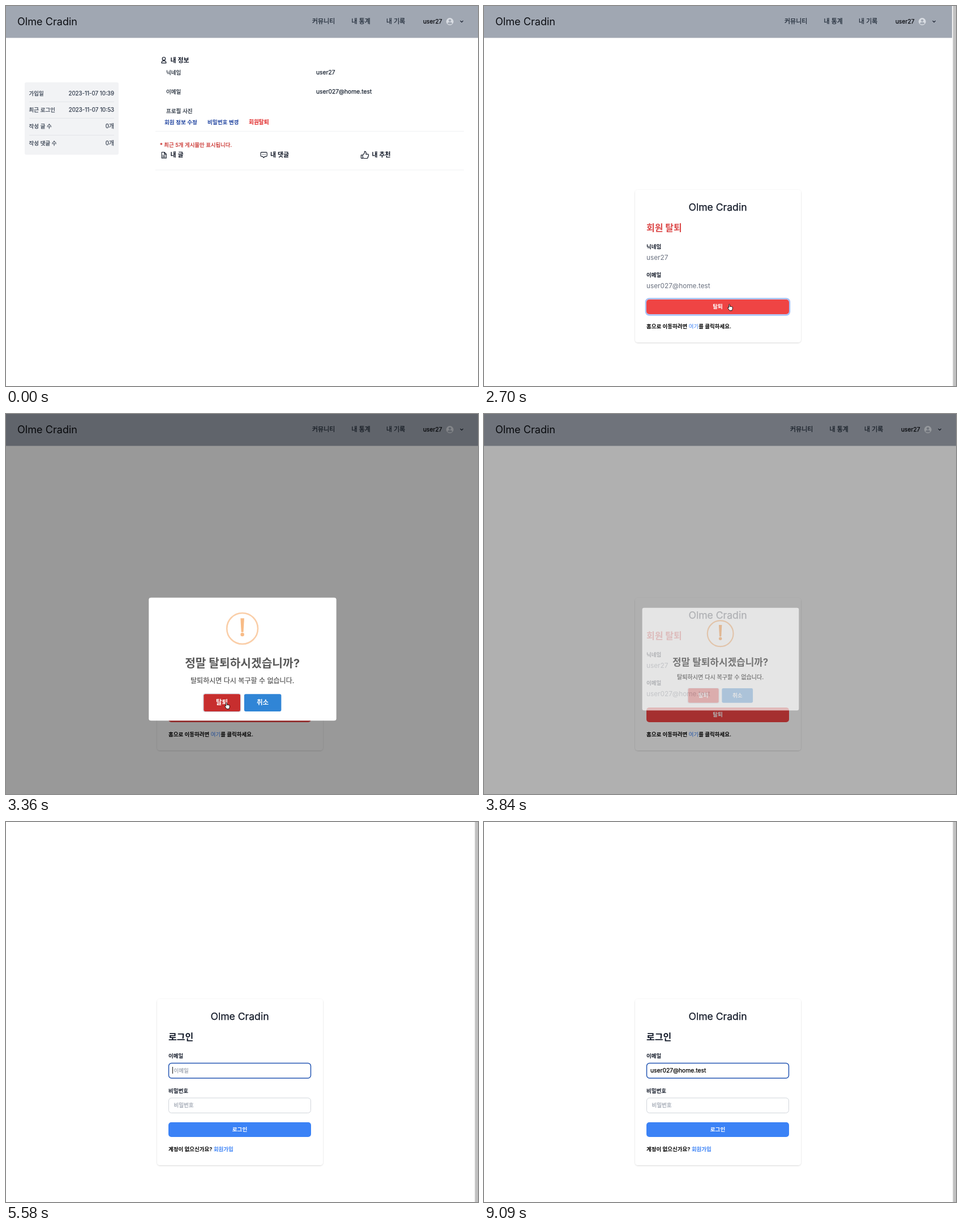
An HTML page that plays this animation: 834x672 px, repeating every 9300 ms.

```html
<!DOCTYPE html>
<html lang="ko">
<head>
<meta charset="utf-8">
<title>회원 탈퇴</title>
<style>
html, body { margin: 0; width: 100%; height: 100%; overflow: hidden; background: #fff; }
svg { display: block; width: 100vw; height: 100vh; font-family: Inter, "Noto Sans CJK KR", "Noto Sans CJK JP", sans-serif; }
</style>
</head>
<body>
<svg id="stage" viewBox="0 0 834 672"></svg>
<script>
const LOOP = 9300;
const BRAND = "Olme Cradin", USER = "user27", MAIL = "user027@home.test";
const BLUE = "#3b82f6", RED = "#ef4444", INK = "#111827";
const stage = document.getElementById("stage");

// y is the visual middle of the line; medium Hangul is a regular face with a hairline outline
const text = (x, y, size, str, fill = INK, weight = 400, anchor = "start", extra = "") => {
  const outline = weight === 500 ? `stroke="${fill}" stroke-width="0.25"` : "";
  return `<text x="${x}" y="${(y + size * 0.37).toFixed(2)}" font-size="${size}" fill="${fill}" font-weight="${weight === 500 ? 400 : weight}" text-anchor="${anchor}" ${outline} ${extra}>${str}</text>`;
};
const rect = (x, y, w, h, r, fill, extra = "") =>
  `<rect x="${x}" y="${y}" width="${w}" height="${h}" rx="${r}" fill="${fill}" ${extra}/>`;
const rule = (x1, x2, y, color) => `<path d="M${x1} ${y}H${x2}" stroke="${color}"/>`;
const icon = (d, width = 1.2) =>
  `<path d="${d}" fill="none" stroke="${INK}" stroke-width="${width}" stroke-linejoin="round" stroke-linecap="round"/>`;
const link = (str, weight) => `<tspan fill="${BLUE}" stroke="none" font-weight="${weight}">${str}</tspan>`;
const group = (id, body) => `<g id="${id}">${body}</g>`;
const card = (y, h) => rect(267, y, 293, h, 5, "#fff", 'filter="url(#soft)"') +
  text(413, y + 30.5, 17.6, BRAND, INK, 500, "middle");

const header = rect(0, 0, 834, 56.4, 0, "#a0a7b2") +
  text(20, 27, 18.1, BRAND, "#0b0d12") +
  group("nav",
    text(541, 27, 11, "커뮤니티", "#1f2937", 500) +
    text(610.5, 27, 11, "내 통계", "#1f2937", 500) +
    text(672, 27, 11, "내 기록", "#1f2937", 500) +
    text(737, 27, 10.3, USER, "#0b0d12", 500) +
    `<circle cx="784.3" cy="27.5" r="6.4" fill="#d9dde3"/>
     <circle cx="784.3" cy="25.6" r="2.2" fill="#a0a7b2"/>
     <path d="M780.2 31.3q0-2.7 4.1-2.7t4.1 2.7q-4.1 2.6-8.2 0z" fill="#a0a7b2"/>` +
    icon("M803 26.4l2.2 2.2 2.2-2.2"));

const stats = [["가입일", "2023-11-07 10:39"], ["최근 로그인", "2023-11-07 10:53"], ["작성 글 수", "0개"], ["작성 댓글 수", "0개"]]
  .map(([name, value], i) => {
    const y = 154 + i * 29.4;
    return text(40.5, y, 9.5, name, "#374151", 500) + text(191, y, 9.8, value, "#374151", 500, "end") +
      (i < 3 ? rule(41, 191, Math.round(y + 15) + 0.5, "#e3e5e9") : "");
  }).join("");

const profile = rect(33, 135, 166, 128, 3, "#f2f3f5") + stats +
  icon("M276.2 93.2a2.7 2.7 0 1 0 5.4 0a2.7 2.7 0 1 0-5.4 0M274.9 100.8q0-4 4-4t4 4z") +
  text(290.5, 95.5, 11, "내 정보", INK, 600) +
  text(283, 117.5, 9.5, "닉네임", "#1f2937", 500) + text(548, 117.5, 10.3, USER, "#1f2937", 500) +
  text(283, 151.5, 9.5, "이메일", "#1f2937", 500) + text(548, 151.5, 10.3, MAIL, "#1f2937", 500) +
  text(283, 185.5, 9.5, "프로필 사진", "#1f2937", 500) +
  text(280, 205.5, 9.6, "회원 정보 수정", "#1e429f", 600) +
  text(356, 205.5, 9.6, "비밀번호 변경", "#1e429f", 600) +
  text(429, 205.5, 9.7, "회원탈퇴", "#e02424", 600, "start", 'id="leave"') +
  rule(264, 809, 221.5, "#f0f1f3") +
  text(272, 245.5, 9.4, "* 최근 5개 게시물만 표시됩니다.", "#c9302c", 500) +
  icon("M275.2 258.5h4.6l3.4 3.4v7h-8zM279.6 258.5v3.6h3.6M277 264.3h4M277 266.6h4", 1.1) +
  text(290.5, 263, 11, "내 글", INK, 600) +
  icon("M451.6 258.6h8q1.6 0 1.6 1.6v4.3q0 1.6-1.6 1.6h-2.4l-1.8 2.3-1.8-2.3h-2q-1.6 0-1.6-1.6v-4.3q0-1.6 1.6-1.6zM453 262.4h.1M455.5 262.4h.1M458 262.4h.1", 1.1) +
  text(467, 263, 11, "내 댓글", INK, 600) +
  icon("M627.5 263.5h2.8v6h-1.8q-1 0-1-1zM630.3 263.4q3.3-2 3.4-6.2q2.8 0 2.6 3.6l-.3 1.4h3.4q1.6.2 1.2 1.8l-1.2 4q-.5 1.6-2 1.5h-4.2l-2.9-1") +
  text(646.5, 263, 11, "내 추천", INK, 600) +
  rule(264, 809, 290, "#f0f1f3");

const withdraw = card(325, 270) +
  text(287, 392, 16, "회원 탈퇴", "#dc4a4a", 700) +
  text(287, 425, 9.5, "닉네임", INK, 600) + text(287, 445, 11.8, USER, "#6b7280") +
  text(287, 475, 9.5, "이메일", INK, 600) + text(287, 495, 11.8, MAIL, "#6b7280") +
  rect(286, 517.5, 254, 29, 6, "none", 'id="ring" stroke="#a4c0f8" stroke-width="2.6"') +
  rect(287, 519, 252, 26, 5, RED) + text(413, 531.5, 9.6, "탈퇴", "#fff", 600, "middle") +
  text(287, 566.5, 9.5, `홈으로 이동하려면 ${link("여기", 400)}를 클릭하세요.`, "#000", 600);

const done = rect(0, 0, 834, 672, 0, "#fff") +
  `<g font-family="Roboto, sans-serif" letter-spacing="0.8" stroke="#1f2f60" stroke-width="0.5">` +
  text(358.5, 119.3, 33, "OLME", "#1f2f60", 400, "end") +
  text(439, 119.3, 33.8, "CRADIN", "#1f2f60") + `</g>
  <circle cx="398.5" cy="119" r="20" fill="#8fd5be"/>` +
  text(418, 194, 23.8, "탈퇴가 완료 되었습니다.", INK, 700, "middle") +
  rect(386.8, 223.8, 62, 29.2, 3, BLUE, 'id="home"') +
  text(417.7, 238, 9.6, "메인으로", "#fff", 600, "middle");

const dots = Array.from({ length: 10 }, (_, i) =>
  `<circle class="dot" cx="${(297.1 + i * 6.3).toFixed(1)}" cy="501" r="2.1" fill="${INK}"/>`).join("");
const login = rect(0, 0, 834, 672, 0, "#fff") + card(313, 294) +
  text(287, 380, 16, "로그인", INK, 700) +
  text(287, 413, 9.5, "이메일", INK, 600) + rect(287.5, 426.5, 251, 26.5, 5, "#fff", 'id="mailBox"') +
  text(296.5, 439, 9.5, "이메일", "#9ca3af", 500, "start", 'id="mailHint"') +
  text(294, 439, 10.3, "", "#000", 500, "start", 'id="mail"') +
  text(287, 475, 9.5, "비밀번호", INK, 600) + rect(287.5, 488, 251, 26.5, 5, "#fff", 'id="passBox"') +
  text(296.5, 500.5, 9.5, "비밀번호", "#9ca3af", 500, "start", 'id="passHint"') + dots +
  rect(294, 433, 1, 12, 0, "#111", 'id="caret"') +
  rect(287, 531, 252, 26, 5, BLUE) + text(413, 543.5, 9.6, "로그인", "#fff", 600, "middle") +
  text(287, 578.5, 9.5, `계정이 없으신가요? ${link("회원가입", 600)}`, "#000", 600);

const dialog = rect(245, 320, 346, 227, 4, "#fff") +
  `<circle cx="417.6" cy="377" r="28.6" fill="none" stroke="#facea8" stroke-width="2.7"/>
   <path d="M414.2 358h6.8l-1.4 25.6h-4z" fill="#f8bb86"/><circle cx="417.6" cy="388.2" r="3.4" fill="#f8bb86"/>` +
  text(417.6, 440.5, 21.2, "정말 탈퇴하시겠습니까?", "#595959", 700, "middle") +
  text(417.6, 473, 12.6, "탈퇴하시면 다시 복구할 수 없습니다.", "#545454", 500, "middle") +
  group("actions",
    rect(344.8, 496.8, 70.4, 34.4, 4, "#b9cde0") + rect(345.6, 497.4, 68.8, 33, 3, "#fff") +
    rect(346.3, 498, 67.6, 32, 3, "#dd3333", 'id="yes"') + text(380, 513.5, 12, "탈퇴", "#fff", 600, "middle") +
    rect(421, 498, 68.4, 32, 3, "#3085d6", 'id="no"') + text(455.2, 513.5, 12, "취소", "#fff", 600, "middle"));

stage.innerHTML =
  `<defs><filter id="soft" x="-5%" y="-5%" width="110%" height="110%">
     <feDropShadow dx="0" dy="0.8" stdDeviation="0.9" flood-opacity="0.18"/></filter></defs>` +
  rect(0, 0, 834, 672, 0, "#fff") + header +
  group("profile", profile) + group("withdraw", withdraw) + group("done", done) + group("login", login) +
  group("bar", rect(827, 0, 7, 672, 0, "#fafafa") + rect(828.6, 0, 5.4, 672, 0, "#c1c1c1")) +
  rect(0, 0, 834, 672, 0, "#000", 'id="shade"') + group("dialog", dialog) +
  group("arrow", `<path d="M0 0v10.2l2.3-2.2 1.6 3.7 1.7-.7-1.6-3.6h3.2z" fill="#000" stroke="#fff" stroke-width=".7"/>`) +
  group("hand", `<path d="M2.6 6.6V1.4q0-1 .9-1t.9 1v3.2q.9-.8 1.7 0 .9-.5 1.6.2 1.4-.3 1.5 1v2.4q-.2 1.4-1 2.2v1.3H4.1L1.2 7.8Q.2 6.4 1 5.9q.7-.3 1.6.7z" fill="#fff" stroke="#000" stroke-width=".9"/>`);

const $ = id => document.getElementById(id);
const dotEls = [...document.querySelectorAll(".dot")];
const show = (id, on) => $(id).setAttribute("visibility", on ? "visible" : "hidden");
const set = (id, attrs) => { for (const k in attrs) $(id).setAttribute(k, attrs[k]); };
const clamp = v => Math.min(1, Math.max(0, v));
const mix = (a, b, p) => a + (b - a) * p;
const within = (t, a, b) => t >= a && t < b;
const every = (start, gap, n) => Array.from({ length: n }, (_, i) => start + i * gap);

const CONFIRM = 3780, FOCUS = 5460, TAB = 7430, RELOAD = 8430, BLINK = 215;
const mailKeys = [5880, 5940, 6000, 6000, ...every(6270, 60, 3), ...every(6540, 84, 6), ...every(7230, 50, 4)];
const passKeys = every(7485, 55, 10);
const edits = [5580, ...mailKeys, TAB, ...passKeys, RELOAD];

function popScale(u) {
  if (u < 0.45) return mix(0.7, 1.05, u / 0.45);
  if (u < 0.8) return mix(1.05, 0.95, (u - 0.45) / 0.35);
  return mix(0.95, 1, clamp((u - 0.8) / 0.2));
}

function drawCursor(t) {
  let kind = "", x = 449, y = 205;
  if (within(t, 1320, 1680)) kind = "hand";
  else if (within(t, 1680, 1860)) kind = "arrow";
  else if (within(t, 2610, 2790)) [kind, x, y] = ["hand", 430, 527];
  else if (within(t, 2790, CONFIRM)) {
    const p = t < 3180 ? 0 : clamp((Math.floor((t - 3180) / 45) + 1) / 5);
    x = mix(433, 386, p);
    y = mix(527, 510, p);
    kind = p > 0 && (x < 414 || x > 421) ? "hand" : "arrow";
  } else if (within(t, 4080, 4350)) [kind, x, y] = ["arrow", 386, 510];
  for (const id of ["arrow", "hand"]) {
    show(id, id === kind);
    set(id, { transform: `translate(${x} ${y})` });
  }
  const over = within(t, 3180, CONFIRM);
  set("yes", { fill: over && x < 414 ? "#c72e2e" : "#dd3333" });
  set("no", { fill: over && x > 421 ? "#2b78c1" : "#3085d6" });
}

function drawDialog(t) {
  const open = within(t, 2790, 3900);
  show("dialog", open);
  show("shade", open);
  if (!open) return;
  const step = Math.floor(t / 30);
  const hide = clamp(0.33 + 0.48 * (step - 128));
  const scale = (t < CONFIRM ? popScale(0.2 + 0.24 * (step - 93)) : 1 - hide / 2) / 1.044;
  const dim = t < 2820 ? 0.24 : 0.4 * (1 - 0.68 * hide);
  set("shade", { opacity: dim });
  set("actions", { opacity: t < CONFIRM ? 1 : 0.4 });
  set("dialog", { opacity: 1 - hide, transform: `translate(417.8 433.5) scale(${scale}) translate(-417.8 -433.5)` });
}

function drawLogin(t) {
  const reloaded = t >= RELOAD;
  const inPass = within(t, TAB, RELOAD);
  const typed = mailKeys.filter(k => k <= t).length;
  const hidden = reloaded ? 0 : passKeys.filter(k => k <= t).length;
  $("mail").textContent = MAIL.slice(0, typed);
  const on = t >= 5130;
  show("mailHint", on && !typed);
  show("passHint", on && !hidden);
  dotEls.forEach((d, i) => d.setAttribute("visibility", on && i < hidden ? "visible" : "hidden"));

  const frame = focused => ({ stroke: focused ? "#2456b3" : "#d1d5db", "stroke-width": focused ? 1.5 : 1 });
  set("mailBox", frame(t >= FOCUS && !inPass));
  set("passBox", frame(inPass));

  const last = Math.max(...edits.filter(e => e <= t));
  show("caret", t >= 5580 && Math.floor((t - last) / BLINK) % 2 === 0);
  const offset = inPass ? hidden * 6.3 : reloaded || !typed ? 0 : $("mail").getComputedTextLength();
  set("caret", { x: 294 + offset, y: inPass ? 494.5 : 433 });
}

function draw(t) {
  show("profile", t < 1680);
  show("withdraw", within(t, 1680, 4080));
  show("done", within(t, 4080, 5130));
  show("login", t >= 5130);
  const bar = within(t, 1680, 2790) || within(t, 3900, 4080) || t >= 5130;
  show("bar", bar);
  set("nav", { transform: `translate(${bar ? -10 : 0} 0)` });
  set("leave", { fill: within(t, 990, 1680) ? "#c81e1e" : "#e02424" });
  show("ring", within(t, 2700, 2790) || within(t, 3900, 4080));
  set("home", { fill: within(t, 4950, 5130) ? "#2563eb" : BLUE });
  drawDialog(t);
  drawLogin(t);
  drawCursor(t);
}

function tick() {
  draw(performance.now() % LOOP);
  requestAnimationFrame(tick);
}
tick();
</script>
</body>
</html>
```
